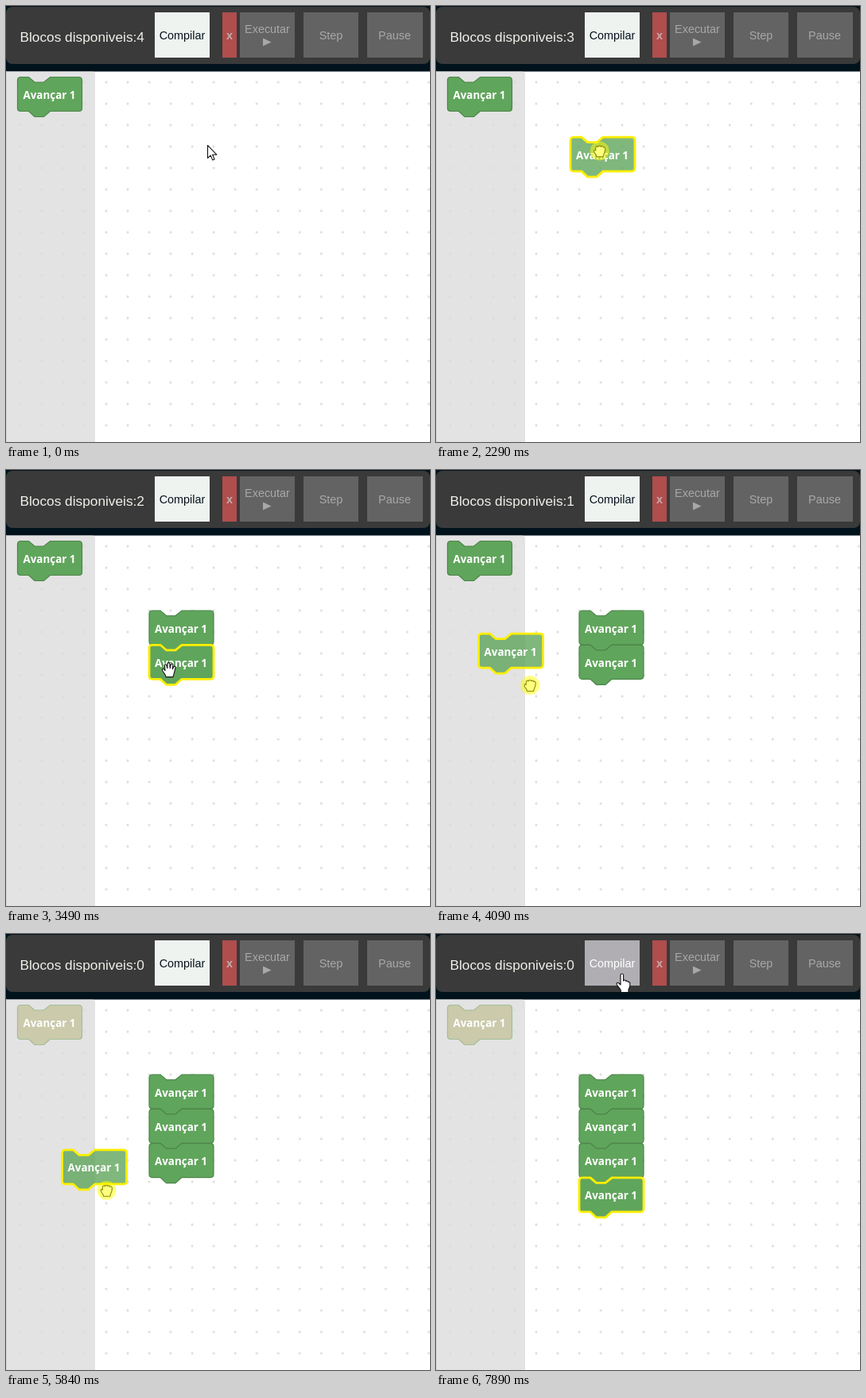
Animation of 533x549 px, one loop 8 s. Source, as an HTML page:

```html
<!DOCTYPE html>
<html lang="pt">
<head>
<meta charset="utf-8">
<title>Blocos</title>
<style>
html, body { margin: 0; width: 100%; height: 100%; overflow: hidden; background: #00131d; }
svg { display: block; width: 533px; height: 549px; }
text { font: 14.4px "Liberation Sans", Arial, sans-serif; text-anchor: middle; fill: #a8a8a8; }
#count { font-size: 17.28px; text-anchor: start; fill: #f1efe9; }
#compile rect { fill: #eef3f0; }
#compile text { fill: #06121c; }
#compile.hover rect { fill: #b0aeb3; }
#compile.hover text { fill: #fff; }
.block path { fill: #60a55c; stroke: #4c8549; stroke-width: 1.2; }
.block text { font: bold 13.4px "Open Sans", "Noto Sans", sans-serif; text-anchor: start; fill: #fff; }
.block.on path { stroke: #fdee00; stroke-width: 2.8; stroke-linejoin: round; }
.block.drag path { fill-opacity: .8; }
.block.off path { fill: #cbcaab; stroke: #a3bd98; }
.ghost { fill: #000; opacity: .2; }
#cursor path { fill: #fff; stroke: #111; stroke-width: 1.1; stroke-linejoin: round; }
#cursor #cross { fill: none; stroke: #f06428; stroke-width: 2; }
</style>
</head>
<body>
<svg viewBox="0 0 533 549">
  <defs>
    <pattern id="grid" x="112.5" y="82.5" width="27.03" height="27" patternUnits="userSpaceOnUse">
      <path d="M12 13.5h3M13.5 12v3" stroke="#dcdcdc" stroke-width="1.6"/>
    </pattern>
    <path id="shape" d="M4 0H14L21.5 6.5H33L41 0H77Q81 0 81 4V39Q81 43 77 43H41L33 50H21.5L14 43H4Q0 43 0 39V4Q0 0 4 0Z"/>
  </defs>
  <rect y="1" width="533" height="72" rx="8" fill="#3a3a3a"/>
  <text id="count" x="17.5" y="45"></text>
  <g id="compile"><rect x="187" y="8" width="69" height="57"/><text x="221.5" y="42">Compilar</text></g>
  <rect x="272" y="8" width="18" height="57" fill="#b04d4d"/>
  <text x="281" y="42" style="fill:#c3aaaa;font-weight:bold">x</text>
  <g fill="#636363">
    <rect x="294" y="8" width="69" height="57"/>
    <rect x="374" y="8" width="69" height="57"/>
    <rect x="454" y="8" width="70" height="57"/>
  </g>
  <text x="328.5" y="34">Executar</text>
  <path d="M323 40.5L333.5 45.5L323 50.5Z" fill="#a8a8a8"/>
  <text x="408.5" y="42">Step</text>
  <text x="488.5" y="42">Pause</text>

  <rect y="82.5" width="533" height="467" fill="#fff"/>
  <rect y="82.5" width="533" height="467" fill="url(#grid)"/>
  <path d="M0 82.5H108Q112 82.5 112 86.5V549H0Z" fill="#ddd" fill-opacity=".8"/>
  <path d="M.5 82.5V549" stroke="#d2d2d2"/>
  <g id="blocks"></g>
  <g id="cursor">
    <path id="arrow" d="M.5 .5V16.5L4.2 13.1L6.7 18.9L9.1 17.9L6.6 12.2H11.8Z"/>
    <path id="open" d="M-4 9L-5 6C-7 3 -9 1 -8.5 -.5C-8 -2 -6 -1.5 -5 1L-5.5 -5C-6 -7.5 -3.5 -7.5 -3 -5L-2.2 -2L-2 -7.5C-2 -9.5 .6 -9.5 .8 -7.5L1.2 -2L2.2 -6.5C2.8 -8.5 5 -8 4.8 -6L4.4 -1L5.6 -3.6C6.5 -5.2 8.6 -4.5 8 -2.5L6.6 3L5 9Z"/>
    <path id="closed" d="M-4 7.5L-4.5 5C-6 3.5 -7.5 1 -7 -.5C-6.5 -1.8 -5.5 -1 -5 -.5L-5 -4C-4.8 -6 -2.6 -6.4 -2 -5C-1.5 -7 1 -7 1.5 -5.2C2.2 -6.6 4.2 -6 4.4 -4.4C5.5 -5.4 7 -4.5 7 -2.5C7 1 6 3 5 5L4.5 7.5Z"/>
    <path id="finger" d="M-2 14V2C-2 -.6 1.6 -.6 1.6 2V9C2 7.4 4.6 7.6 4.8 9.6C5.2 8.4 7.4 8.8 7.6 10.6C8.2 9.8 9.8 10.4 9.8 12V16L8 20V23.5H-1.5L-2 20L-6.5 14C-8 11.5 -5 10.5 -4 12Z"/>
    <path id="cross" d="M3 6L9 12M9 6L3 12"/>
    <circle id="press" r="12" fill="#ff0" fill-opacity=".5"/>
  </g>
</svg>
<script>
const LOOP = 8000, LEAD = 46, PRESS = 80;
const HOME = { x: 14.5, y: 89.5 }, STACK = { x: 180, y: 177, step: 43.3 };
const $ = id => document.getElementById(id);
const clamp = u => Math.min(1, Math.max(0, u));
const smooth = u => u * u * (3 - 2 * u);

// bend curves the way; miss is how far past its slot a block is let go
const drags = [
  { start: 1824, end: 2479, drop: 2500, bend: .8, miss: 0, grip: [32, 13] },
  { start: 2980, end: 3310, drop: 3350, bend: 1.05, miss: 14, grip: [39, 37] },
  { start: 3980, end: 4440, drop: 4480, bend: 1.75, miss: 14, grip: [39, 37] },
  { start: 5595, end: 6300, drop: 6970, bend: 2, miss: 5, grip: [39, 37] }
];
drags.forEach((d, i) => { d.y = STACK.y + STACK.step * i; });

function carry(d, t) {
  const u = clamp((t - d.start) / (d.end - d.start)), s = u * (2 - u);
  return [
    HOME.x + (STACK.x + d.miss * .7 - HOME.x) * s ** d.bend,
    HOME.y + (d.y + d.miss - HOME.y) * (1 - (1 - s) ** d.bend)
  ];
}

// the mouse is a chain of moves, each starting where the last one ended
const moves = [];
let end = [253, 175];
function move(from, to, path) {
  moves.push({ from, path });
  end = path(to);
}
function glide(from, to, x, y, bow = 0) {
  const [a, b] = end;
  move(from, to, t => {
    const s = smooth(clamp((t - from) / (to - from)));
    return [a + (x - a) * s + bow * 4 * s * (1 - s), b + (y - b) * s];
  });
}
const grab = (from, to, d) => glide(from, to, HOME.x + d.grip[0], HOME.y + d.grip[1]);
const drag = d => move(d.start - LEAD, d.end, t => carry(d, t + LEAD).map((v, k) => v + d.grip[k]));

glide(0, 290, 309, 255);
glide(530, 1330, 98, 112);
grab(1340, 1680, drags[0]);
drag(drags[0]);
grab(2520, 2860, drags[1]);
drag(drags[1]);
grab(3380, 3860, drags[2]);
drag(drags[2]);
grab(4590, 5000, drags[3]);
drag(drags[3]);
glide(6970, 7770, 238, 57, 60);
glide(7790, 7890, 234, 50);

function add(markup) {
  $('blocks').insertAdjacentHTML('beforeend', markup);
  return $('blocks').lastElementChild;
}
const addBlock = () => add(`<g class="block">${$('shape').outerHTML.replace('id="shape"', '')}<text x="7" y="27.5">Avançar 1</text></g>`);
const place = (el, x, y) => el.setAttribute('transform', `translate(${x.toFixed(2)} ${y.toFixed(2)})`);
const show = (el, on) => { el.style.display = on ? '' : 'none'; };

const stock = addBlock();
place(stock, HOME.x, HOME.y);
const ghost = add('<use href="#shape" class="ghost"/>');
const copies = drags.map(addBlock);

function draw(t) {
  const [x, y] = moves.findLast(m => t >= m.from).path(t);
  const used = drags.filter(d => t >= d.start).length;
  const dropped = drags.filter(d => t >= d.drop).length;
  const pressed = drags.some(d => t >= d.start - PRESS && t < d.drop);
  const dragging = used > dropped;
  const inside = (l, top, r, b) => x >= l && x <= r && y >= top && y <= b;
  const overStock = inside(14, 89, 96, 140);
  const overStack = dropped > 0 && inside(180, 177, 262, drags[dropped - 1].y + 50);
  const overButton = inside(187, 8, 256, 65);

  $('count').textContent = 'Blocos disponiveis:' + (4 - used);
  $('compile').classList.toggle('hover', overButton);
  stock.classList.toggle('on', overStock && !dragging && used < 4);
  stock.classList.toggle('off', used === 4);

  let preview = false;
  copies.forEach((el, i) => {
    const d = drags[i], held = t < d.drop;
    const [bx, by] = held ? carry(d, t) : [STACK.x, d.y];
    show(el, i < used);
    place(el, bx, by);
    el.classList.toggle('on', i === used - 1);
    el.classList.toggle('drag', held);
    if (i && held && Math.hypot(bx - STACK.x, by - d.y) < 45) {
      preview = true;
      place(ghost, STACK.x, d.y);
    }
  });
  show(ghost, preview);

  const kind = overButton ? 'finger' : pressed ? 'closed' : overStock || overStack ? 'open' : 'arrow';
  for (const id of ['arrow', 'open', 'closed', 'finger']) show($(id), id === kind);
  show($('press'), pressed);
  show($('cross'), dragging && x < 112);
  place($('cursor'), x, y);
}

const start = performance.now();
function tick() {
  draw((performance.now() - start) % LOOP);
  requestAnimationFrame(tick);
}
tick();
</script>
</body>
</html>
```
